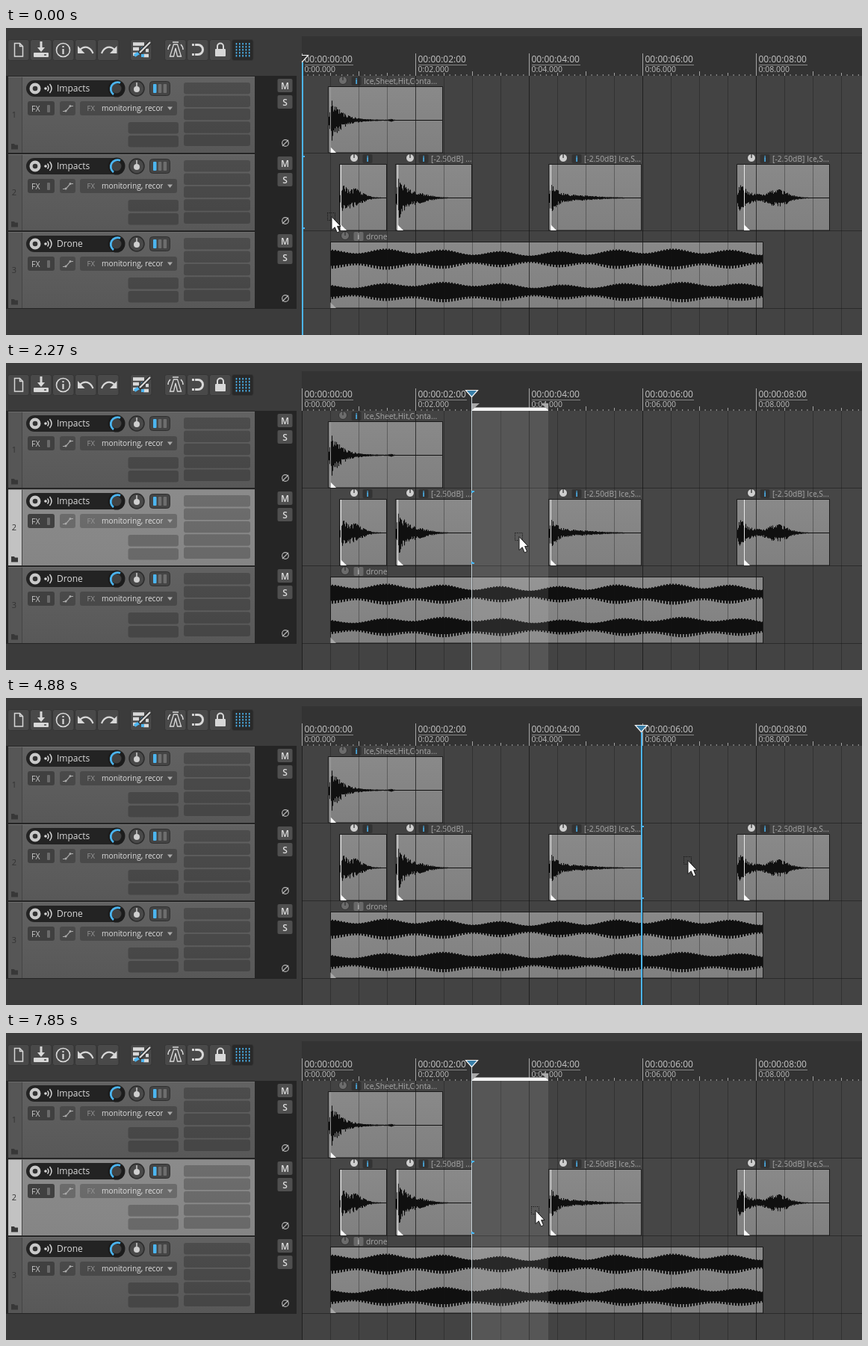
Write an HTML page that moves like this. It is 1146 by 411 pixels and loops after 8 s.

```html
<!DOCTYPE html>
<html lang="en">
<head>
<meta charset="utf-8">
<title>Track editor</title>
<style>
html, body { margin: 0; width: 100%; height: 100%; overflow: hidden; background: #3b3b3b; }
svg { display: block; width: 100vw; height: 100vh; }
text { font-family: "Open Sans", "Noto Sans", sans-serif; }
.crisp { shape-rendering: crispEdges; }
</style>
</head>
<body>
<svg id="stage" viewBox="0 0 1146 411" xmlns="http://www.w3.org/2000/svg"></svg>
<script>
const LOOP = 8000, LEFT = 396, SECOND = 76, LANE = 104;
const BLUE = '#4cb5f0', INK = '#101010', LIGHT = '#d8d8d8', INSET = 'rgba(0,0,0,.22)';

const rect = (x, y, w, h, fill, more = '') =>
  `<rect x="${x}" y="${y}" width="${w}" height="${h}" fill="${fill}" ${more}/>`;
const path = (d, stroke, width = 1, fill = 'none', more = '') =>
  `<path d="${d}" stroke="${stroke}" stroke-width="${width}" fill="${fill}" ${more}/>`;
const shape = (d, fill, more) => path(d, 'none', 0, fill, more);
const circle = (x, y, r, fill, stroke = 'none', width = 1) =>
  `<circle cx="${x}" cy="${y}" r="${r}" fill="${fill}" stroke="${stroke}" stroke-width="${width}"/>`;
const text = (x, y, size, fill, str, more = '') =>
  `<text x="${x}" y="${y}" font-size="${size}" fill="${fill}" ${more}>${str}</text>`;
const group = (body, more = '') => `<g ${more}>${body}</g>`;
const range = (n, f) => Array.from({ length: n }, (_, i) => f(i)).join('');

function randomFrom(seed) {
  return () => (seed = (seed * 16807) % 2147483647) / 2147483647;
}

// One vertical stroke per pixel column; height(x) gives [up, down].
function wave(x0, x1, mid, height) {
  let d = '';
  for (let x = x0; x < x1; x++) {
    const [up, down] = height(x);
    d += `M${x + .5} ${(mid - up).toFixed(1)}V${(mid + down).toFixed(1)}`;
  }
  return path(d, INK, 1.1);
}

// A sharp attack with exponential decay, plus one later swell.
function hitWave(x0, x1, mid, { peak, decay, swell, at, width }) {
  const rnd = randomFrom(x0 * 31 + 7);
  return wave(x0, x1, mid, x => {
    const t = x - x0;
    const level = peak * Math.min(1, (t + 1) / 4) * Math.exp(-t / decay) + swell * Math.exp(-(((t - at) / width) ** 2));
    const swing = () => .5 + level * (.4 + .6 * rnd());
    return [swing(), swing()];
  });
}

// Two slow beats over a fine comb.
function droneWave(mid, crest, beat, drift, depth) {
  const swing = (x, period) => Math.cos(2 * Math.PI * (x - crest) / period);
  return wave(435, 1013, mid, x => {
    const level = 9.5 + depth * swing(x, beat) + 1.8 * swing(x, drift);
    return x % 4 < 2 ? [level, level] : [level * .9, level * .7];
  });
}

function item({ x, end, top, label = '', snap = 3, dim = false, plain = false, body }) {
  const bottom = top + 88, sx = x + snap;
  return rect(x, top, end - x, 88, 'url(#itemFill)') + body +
    path(`M${x + .5} ${top - .5}H${end - .5}V${bottom}H${x + .5}Z`, '#1b1b1b') +
    (plain ? '' : path(`M${sx + .5} ${top}V${bottom}`, '#e8e8e8')) +
    shape(`M${sx} ${bottom - 8}V${bottom}H${sx + 8}Z`, plain ? '#a8a8a8' : '#fff') +
    circle(x + 20, top - 9, 5.5, dim ? '#6c6c6c' : '#cfcfcf', '#333') +
    path(`M${x + 20} ${top - 14}v5`, '#333', 1.3) +
    rect(x + 31.5, top - 14, 13, 12, plain ? '#686868' : '#333', 'rx="2"') +
    text(x + 38, top - 4, 10.5, plain ? '#ccc' : BLUE, 'i', 'font-weight="700" text-anchor="middle"') +
    text(x + 48, top - 4, 10.3, '#a9a9a9', label);
}

function items() {
  const hit = (x, end, top, sound, more) =>
    item({ x, end, top, body: hitWave(x + 1, end - 1, top + 44.5, sound), ...more });
  const quiet = '[-2.50dB] Ice,S...';
  return hit(431, 585, 79, { peak: 36, decay: 15, swell: 1.5, at: 83, width: 3 }, { label: 'Ice,Sheet,Hit,Conta...', dim: true }) +
    hit(446, 510, 183, { peak: 22, decay: 11, swell: 9, at: 20, width: 15 }, { snap: 2 }) +
    hit(521, 624, 183, { peak: 42, decay: 12, swell: 4, at: 32, width: 20 }, { label: '[-2.50dB] ...' }) +
    hit(726, 851, 183, { peak: 30, decay: 8, swell: 3.5, at: 30, width: 42 }, { label: quiet }) +
    hit(978, 1103, 183, { peak: 27, decay: 13, swell: 11, at: 54, width: 20 }, { label: quiet, snap: 10 }) +
    item({ x: 434, end: 1014, top: 287, label: 'drone', snap: 0, dim: true, plain: true,
      body: droneWave(309.5, 508, 77, 380, 2.8) + droneWave(353.5, 585, 80, 318, 2.4) });
}

function grid() {
  return group(range(20, i => path(`M${LEFT + i * SECOND / 2 + .5} 64V411`, '#151515', 1, 'none',
    `opacity="${i % 4 ? .36 : .75}"`)), 'class="crisp"');
}

function ruler() {
  const ticks = range(99, i => `M${(LEFT + i * SECOND / 10 + .5).toFixed(1)} 64v${i % 5 ? -2 : i % 10 ? -4 : -6}`);
  return path(ticks, '#a2a2a2') + range(5, i => {
    const x = LEFT + i * 2 * SECOND;
    return path(`M${x + .5} 34V64`, '#a5a5a5') + path(`M${x + 4} 49.5h65`, '#858585') +
      text(x + 3.5, 46, 12, '#c6c6c6', `00:00:0${i * 2}:00`) +
      text(x + 3.5, 59, 10.5, '#bdbdbd', `0:0${i * 2}.000`);
  });
}

function track(i, name) {
  const face = rect(3, 65, 330, 102, 'url(#panel)', `id="panel${i}"`) +
    rect(3, 65, 18, 102, '#565656', `id="strip${i}"`) +
    path('M21.5 65v102', '#454545') +
    path('M3 65.5H333', '#777', 1, 'none', 'opacity=".7"') +
    text(11, 120, 11, '#333', i + 1, 'text-anchor="middle"') +
    shape('M7 155h4l1 1.500h4v6H7Z', '#383838') +
    range(5, k => rect(238, 73 + k * 17.4, 89, 15.5, INSET, 'rx="3"')) +
    range(2, k => rect(163.5, 126 + k * 18, 67.5, 15.5, INSET, 'rx="3"'));
  const header = rect(27, 70, 132, 22, '#232323', 'rx="11"') +
    circle(39, 81, 5.4, '#333', '#c9c9c9', 4.2) +
    circle(53, 81, 1.8, LIGHT) +
    path('M55.5 77.5q3 3.5 0 7M58.5 75q5 6 0 12', LIGHT, 1.4) +
    text(68, 85, 12, '#dadada', name) +
    circle(148, 81, 11.5, '#1c1c1c') + circle(148, 81, 6.5, '#414141') +
    path('M144 89A9 9 0 0 1 153 73.500', BLUE, 2.8) +
    circle(175, 81, 10, '#494949', '#2b2b2b', 1.5) + circle(175, 82, 4, '#cfcfcf') +
    path('M175 73v8', '#cfcfcf', 1.5) +
    rect(192.5, 71.5, 27, 19, '#444', 'rx="4" stroke="#303030"') +
    range(3, k => rect(197 + k * 6.8, 75, 4.5, 12, k ? '#6d6d6d' : BLUE, 'rx="1"'));
  const row = rect(29, 98, 36, 19, '#404040', 'rx="3"') + text(34, 112, 10.5, '#c8c8c8', 'FX') +
    rect(55, 103, 4, 10, '#6b6b6b', 'rx="1"') +
    rect(72, 98, 21, 19, INSET, 'rx="3"') +
    path('M76 111.5h4l6-7h4', '#aaa', 1.2) + circle(80, 111, 1.5, '#aaa') + circle(86, 104.5, 1.5, '#aaa') +
    rect(99, 98, 130, 19, INSET, 'rx="3"') + text(108.5, 111, 9.5, '#999', 'FX') +
    text(128, 111, 10.2, '#e0e0e0', 'monitoring, record', 'clip-path="url(#fxClip)"') +
    shape('M216 105.500h7l-3.500 4.500Z', '#aaa');
  const button = (y, letter) => rect(363.5, y, 20, 18, '#4f4f4f', 'rx="2"') +
    text(373.5, y + 13.5, 12, '#dedede', letter, 'font-weight="600" text-anchor="middle"');
  const mutes = button(68, 'M') + button(90, 'S') +
    circle(374, 154, 4.3, 'none', '#b5b5b5', 1.2) + path('M370 158l8-8', '#b5b5b5', 1.2);
  return group(face + header + row + mutes, `transform="translate(0 ${i * LANE})"`);
}

function toolbar() {
  const buttons = range(10, i => rect(2.5 + 30 * i + (i > 4 && 14) + (i > 5 && 16), 15.5, 28.5, 28,
    i === 9 ? '#292929' : '#494949', 'rx="3" stroke="#353535"'));
  const undo = path('M99 29C105 23 113 25 116.500 34', LIGHT, 2.2) + shape('M96 24v10h9.500Z', LIGHT);
  return buttons +
    path('M11.500 20.500h7l4 4v13.500h-11ZM18.500 20.500v4h4', LIGHT, 1.5) +
    path('M47 18v10', LIGHT, 3) + shape('M42 26h10l-5 6Z', LIGHT) +
    rect(37, 33, 20, 6, LIGHT, 'rx="1"') + path('M51 36h3', '#444', 1.5) +
    circle(76.5, 29.5, 9, 'none', LIGHT, 1.6) + path('M76.500 28v7M76.500 24v2', LIGHT, 2.2) +
    undo + group(undo, 'transform="translate(244.500 0) scale(-1 1)"') +
    path('M170 21.500h15M170 28h8M170 35h5M184 37h7M187 30h4', LIGHT, 4.5) +
    path('M172 37L180 32M181 37h4M181 27l3 2', BLUE, 4) + path('M178 34L193 19', '#2c2c2c', 5) +
    path('M179 33L193 19', LIGHT, 2.4) +
    path('M224.500 22h5l5 16h-5l-2.500-11-2.500 11h-5Z', LIGHT, 1.3) +
    path('M220 22q-3 3-3 7M234 22q3 3 3 7M223 19h8', LIGHT, 1.5) +
    path('M249 22.500h8a6.500 6.500 0 0 1 0 13h-8', LIGHT, 3) + path('M252.500 20v18', '#494949', 1.2) +
    rect(280, 28, 14, 10, LIGHT, 'rx="1"') + path('M283 28v-3.500a4 4 0 0 1 8 0V28', LIGHT, 2) +
    range(5, i => path(`M${308.5 + i * 4.3} 20v19`, BLUE, 1.6, 'none', 'stroke-dasharray="2.500 1.500"'));
}

document.getElementById('stage').innerHTML = `<defs>
  <linearGradient id="itemFill" x2="0" y2="1"><stop stop-color="#898989"/><stop offset="1" stop-color="#808080"/></linearGradient>
  <linearGradient id="panel" x2="0" y2="1"><stop stop-color="#626262"/><stop offset="1" stop-color="#585858"/></linearGradient>
  <linearGradient id="panelOn" x2="0" y2="1"><stop stop-color="#8b8b8b"/><stop offset="1" stop-color="#858585"/></linearGradient>
  <clipPath id="fxClip"><path d="M126 98h84v20h-84Z"/></clipPath>
  <clipPath id="arrange"><path d="M396 0H1146V411H396Z"/></clipPath></defs>` +
  rect(0, 0, 1146, 411, '#3b3b3b') + rect(LEFT, 11, 750, 53, '#333') + rect(LEFT, 64, 750, 347, '#434343') +
  rect(LEFT, 168, 750, 103, '#464646', 'id="lane"') +
  path('M396 167.500H1146M396 271.500H1146M396 375.500H1146', '#2b2b2b') +
  items() + grid() + ruler() +
  group(rect(0, 64, 0, 347, '#fff', 'id="shade" opacity=".1"') + rect(0, 59.5, 0, 4.5, '#f3f3f3', 'id="bar"') +
    shape('', '#a8a8a8', 'id="handles"'), 'id="selection"') +
  group(group(rect(0, 46, 2, 365, BLUE, 'id="line"') +
    path('M1 172h3M1 268h3M1 171v3M1 266v3', BLUE, 2) +
    path('M-7.500 36.500h16L.5 45.500Z', '#f2f2f2', 1.2, '#397fa8', 'id="flag"'), 'id="playhead"'), 'clip-path="url(#arrange)"') +
  rect(0, 64, 389, 312, '#252525') + ['Impacts', 'Impacts', 'Drone'].map((name, i) => track(i, name)).join('') +
  toolbar() +
  group(path('M-4.500-4.500H5.500M-4.500 5.500H5.500M-4.500-4.500V5.500M5.500-4.500V5.500', INK, 1, 'none', 'stroke-dasharray="1 1.500"') +
    group(circle(2.5, 1.5, 9.6, 'none', '#2b2b2b', 2.2) + circle(2.5, 1.5, 9.6, 'none', '#eee', 1.4), 'id="ring"') +
    path('M1 .500V18.500l4.200-3.800 3.100 7.100 3.300-1.400-3-7h4.400Z', '#161616', 1, '#fff'), 'id="cursor"');

const START = { x: 435, y: 252 };
const GLIDES = [
  { at: 160, steps: 1, pace: 120, x: 412, y: 215 },
  { at: 310, steps: 2, pace: 120, x: 425, y: 215 },
  { at: 580, steps: 3, pace: 120, x: 672, y: 228 },
  { at: 2270, steps: 5, pace: 120, x: 912, y: 214, sag: 26 },
  { at: 4040, steps: 3, pace: 280, x: 912, y: 217 },
  { at: 6000, steps: 4, pace: 143, x: 670, y: 219, sag: 19 },
  { at: 7190, steps: 10, pace: 130, x: 726, y: 246 }
];
const CLICKS = [{ from: 1100, to: 1340 }, { from: 3350, to: 3610 }, { from: 6730, to: 7040 }];
const FIRST_GAP = { head: 623, end: 726 }, SECOND_GAP = { head: 850, end: 978 };
const VIEWS = [
  { at: 0, head: LEFT },
  { at: 1100, head: LEFT, selected: true },
  { at: 1220, ...FIRST_GAP, selected: true },
  { at: 3490, ...SECOND_GAP, selected: true },
  { at: 4880, head: SECOND_GAP.head },
  { at: 6730, head: SECOND_GAP.head, selected: true },
  { at: 6880, ...FIRST_GAP, selected: true }
];

const $ = id => document.getElementById(id);
const set = (id, attrs) => Object.entries(attrs).forEach(([k, v]) => $(id).setAttribute(k, v));
const show = (id, on) => set(id, { visibility: on ? 'visible' : 'hidden' });
const ease = p => p * p * p * (p * (6 * p - 15) + 10);

// The pointer is redrawn in discrete steps along each eased, sagging glide.
function pointerAt(t) {
  const i = GLIDES.findLastIndex(glide => glide.at <= t);
  if (i < 0) return START;
  const { at, steps, pace, x, y, sag = 0 } = GLIDES[i], from = GLIDES[i - 1] || START;
  const p = ease(Math.min(1, (Math.floor((t - at) / pace) + 1) / steps));
  return {
    x: Math.round(from.x + (x - from.x) * p),
    y: Math.round(from.y + (y - from.y) * p + sag * Math.sin(Math.PI * p))
  };
}

function draw(t) {
  const { x, y } = pointerAt(t);
  const { head, end, selected } = VIEWS.findLast(view => view.at <= t);
  const pale = head === FIRST_GAP.head;
  set('cursor', { transform: `translate(${x} ${y})` });
  show('ring', CLICKS.some(({ from, to }) => t >= from && t < to));

  show('lane', selected);
  set('panel1', { fill: selected ? 'url(#panelOn)' : 'url(#panel)' });
  set('strip1', { fill: selected ? '#c2c2c2' : '#565656' });

  set('playhead', { transform: `translate(${head} 0)` });
  set('line', { fill: pale ? '#c9d3d8' : BLUE, width: pale ? 1 : 2 });
  set('flag', { fill: head === LEFT ? '#333' : '#397fa8' });

  show('selection', end);
  if (end) {
    const start = head + 1, width = end - start;
    set('shade', { x: start, width });
    set('bar', { x: start, width });
    set('handles', { d: `M${start} 54h10L${start} 63ZM${end} 54h-10L${end} 63Z` });
  }
}

const began = performance.now();
function tick() {
  draw((performance.now() - began) % LOOP);
  requestAnimationFrame(tick);
}
tick();
</script>
</body>
</html>
```
